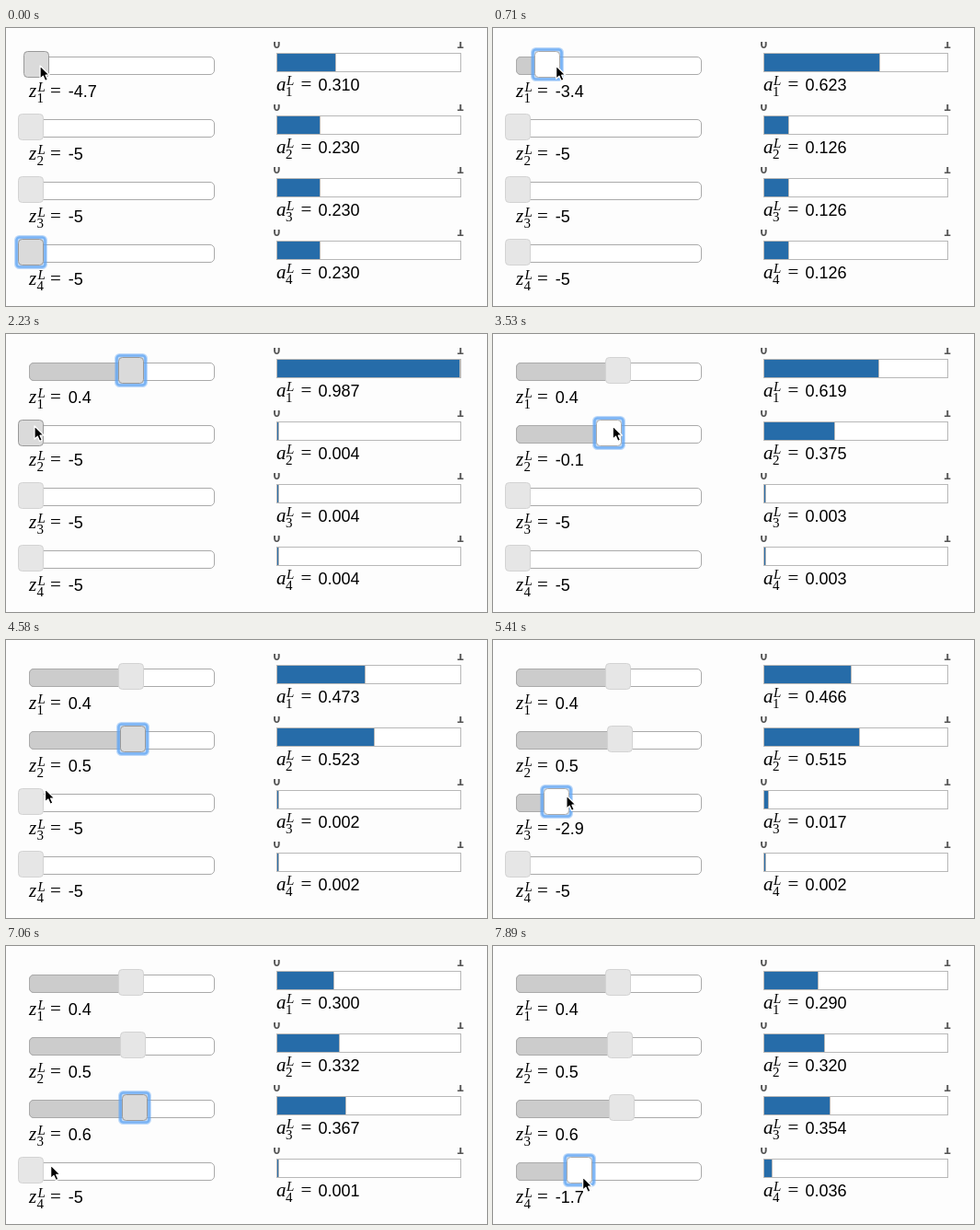
These frames come from a looping animation (523x302 px, 8000 ms). An HTML page:

```html
<!DOCTYPE html>
<html lang="en">
<head>
<meta charset="utf-8">
<title>Softmax sliders</title>
<style>
  html, body { margin: 0; width: 100%; height: 100%; overflow: hidden; background: #fdfdfd; }
  svg { display: block; }
  .num { font: 18px "Liberation Sans", Arial, sans-serif; }
  .math { font: 21px "Liberation Serif", Times, serif; }
  .small { font-size: 15px; }
  .it { font-style: italic; }
  .axis { font: bold 14px "Liberation Sans", Arial, sans-serif; fill: #555; text-anchor: middle; }
</style>
</head>
<body>
<svg id="stage" width="523" height="302" viewBox="0 0 523 302"></svg>
<script>
const LOOP = 8000, STEPS = 68, PITCH = 68;

// Each row is dragged once: first and last step, pointer height, z at a few steps
const drags = [
  { from: 1, to: 16, y: 41, keys: [[1, -4.7], [4, -4.5], [9, -1.5], [12, -3.7], [16, 0.4]] },
  { from: 20, to: 35, y: 100, keys: [[21, -5], [30, -0.1], [34, 0.5]] },
  { from: 41, to: 57, y: 169, keys: [[42, -5], [51, 0.1], [52, 0.1], [56, 0.6]] },
  { from: 62, to: 67, y: 251, keys: [[62, -5], [67, -1.7]] }
];

const clamp = p => Math.min(1, Math.max(0, p));
const ease = p => p * p * (3 - 2 * p);
const mix = (a, b, p) => a + (b - a) * p;

function zAt(keys, n) {
  let z = keys[0][1];
  for (let i = 1; i < keys.length; i++) {
    const [t0] = keys[i - 1], [t1, z1] = keys[i];
    z = mix(z, z1, ease(clamp((n - t0) / (t1 - t0))));
  }
  return z;
}

const handleX = z => 27 + (z + 5) * 20.2;

// The handle trails the pointer a little
const grip = (drag, n) => [handleX(zAt(drag.keys, n + 0.35)) + 4, drag.y];

// During a drag the pointer holds the handle; then it glides to the next one
function pointerAt(n) {
  const i = drags.findLastIndex(d => n >= d.from);
  if (i < 0) return grip(drags[0], n);
  const here = grip(drags[i], n), next = drags[i + 1];
  if (n <= drags[i].to || !next) return here;
  const p = ease(clamp((n - drags[i].to) / (next.from - 1 - drags[i].to)));
  return grip(next, n).map((v, k) => mix(here[k], v, p));
}

const rect = (x, y, w, h, fill, stroke, rx = 0, more = "") =>
  `<rect x="${x}" y="${y}" width="${w}" height="${h}" rx="${rx}" fill="${fill}" stroke="${stroke}" ${more}/>`;

const text = (cls, x, y, s) => `<text class="${cls}" x="${x}" y="${y}">${s}</text>`;

const formula = (name, row, x, y, script, equals, number, value) =>
  text("math it", x, y, name) + text("math it small", x + script + 1, y - 6, "L") +
  text("math small", x + script, y + 6, row + 1) + text("math", equals, y, "=") +
  text("num", number, y, value);

function handle(x, focused, hovered, active) {
  const left = Math.round(x) - 13.5;
  const glow = (width, alpha) => rect(left - 2, 23.5, 31, 32, "none", "#62a6f3", 3,
    `stroke-width="${width}" opacity="${alpha}"`);
  const [fill, edge] = active ? ["#fff", "#aaa"]
    : focused || hovered ? ["#dadada", "#999"] : ["#e6e6e6", "#d3d3d3"];
  return (focused ? glow(5, 0.4) + glow(2.6, 0.75) : "") + rect(left, 25.5, 27, 28, fill, edge, 4);
}

const pointer = (x, y) =>
  `<path transform="translate(${x} ${y})" d="M0 0V14.2L3.3 11.2L5.6 16.4L8.3 15.2L6 10.2H10.3Z"
    stroke="#fff" stroke-width="1.2" stroke-linejoin="round"/>`;

function draw(n) {
  const zs = drags.map(d => Math.round(zAt(d.keys, n) * 10) / 10);
  const exps = zs.map(Math.exp);
  const sum = exps.reduce((a, b) => a + b);
  const held = drags.findIndex(d => n >= d.from && n <= d.to);
  const focus = (drags.filter(d => n >= d.from).length + 3) % 4;
  const [px, py] = pointerAt(n);

  const rows = zs.map((z, row) => {
    const x = handleX(z), a = exps[row] / sum;
    const hovered = held < 0 && Math.abs(px - x) < 14 && Math.abs(py - row * PITCH - 39.5) < 14;
    return `<g transform="translate(0 ${row * PITCH})">` +
      rect(25.5, 31.5, 201, 19, "#fff", "#aaa", 4.5) +
      rect(25.5, 31.5, x - 25.5, 19, "#ccc", "#aaa", 4.5) +
      handle(x, row === focus, hovered, row === held) +
      formula("z", row, 25, 75, 8.5, 48, 67.7, z) +
      `<g clip-path="url(#cut)">${text("axis", 294.5, 22, 0)}${text("axis", 494, 22, 1)}</g>` +
      rect(294.5, 27.5, 200, 20, "#fff", "#b8b8b8") +
      rect(294.5, 27.5, Math.min(200, Math.round(200 * a + 1.5)), 20, "#266ca9", "#b8b8b8") +
      formula("a", row, 294, 68, 10, 320.5, 339.5, a.toFixed(3)) + "</g>";
  });
  return '<clipPath id="cut"><rect x="280" y="15" width="230" height="9"/></clipPath>' +
    rows.join("") + pointer(px, py);
}

const stage = document.getElementById("stage");
let shown = -1;
function tick() {
  // Ten ms of slack absorbs rounding of the step times
  const n = Math.floor((performance.now() + 10) % LOOP / LOOP * STEPS);
  if (n !== shown) stage.innerHTML = draw(shown = n);
  requestAnimationFrame(tick);
}
tick();
</script>
</body>
</html>
```
